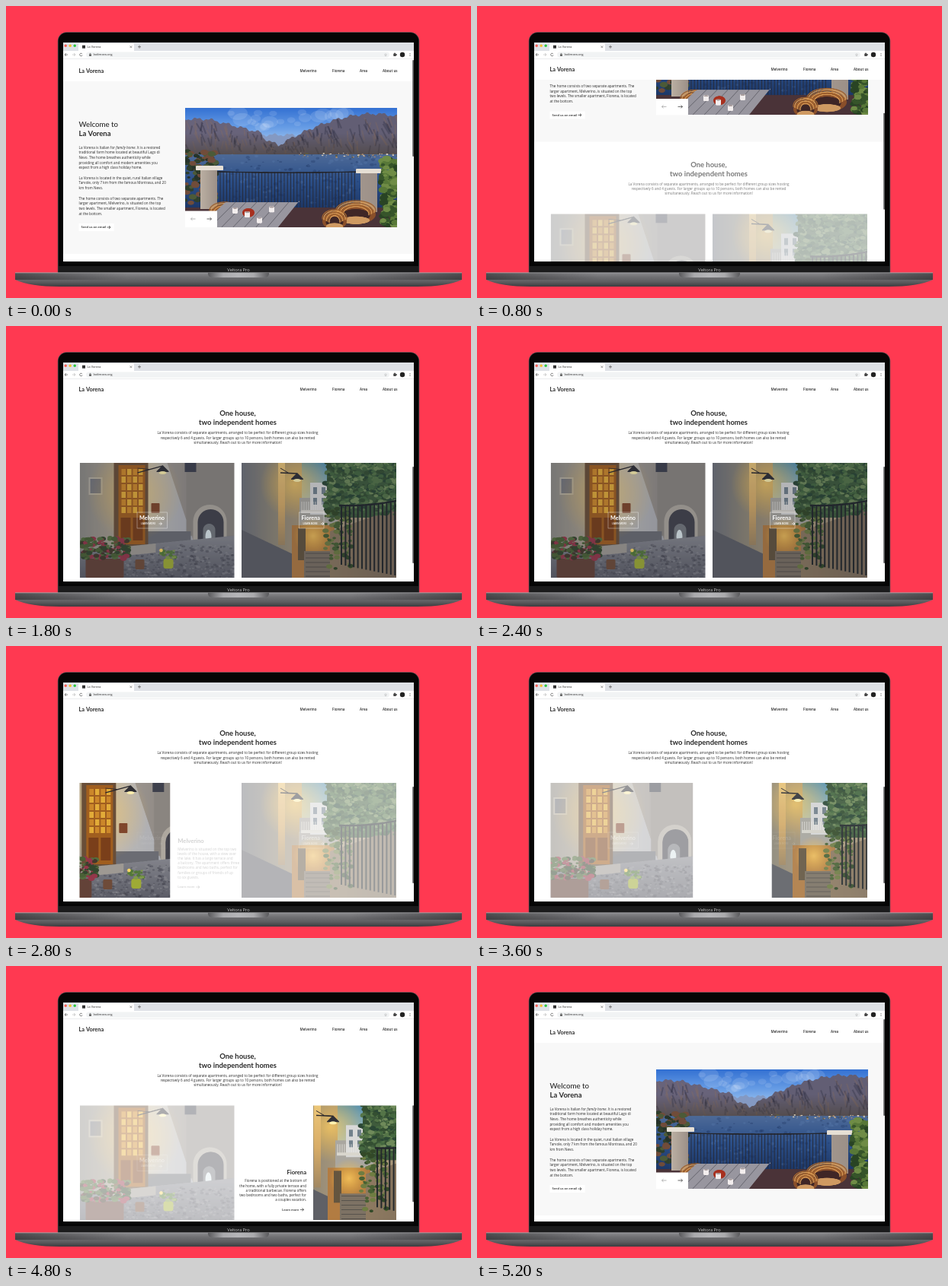
Write an HTML page with a canvas that moves like this. It is 610x384 px and loops after 5.4 s.

```html
<!DOCTYPE html>
<html lang="en">
<head>
<meta charset="utf-8">
<title>La Vorena</title>
<style>
html, body { margin: 0; width: 100%; height: 100%; overflow: hidden; background: #ff3951; }
canvas { display: block; width: 610px; height: 384px; }
</style>
</head>
<body>
<canvas id="stage"></canvas>
<script>
const W = 610, H = 384, LOOP = 5400, STEP = 200;
const SANS = '"Open Sans", "Noto Sans", sans-serif';
const HEAD = 'Lato, "Open Sans", sans-serif';
const HOME = 'La Vorena', APT1 = 'Melverino', APT2 = 'Fiorena';
const INK = '#2a2a2a', TAU = Math.PI * 2;
const dpr = window.devicePixelRatio || 1;
const stage = document.getElementById('stage');
stage.width = W * dpr;
stage.height = H * dpr;
const screen2d = stage.getContext('2d');
let c = screen2d;

// --- helpers ---
const clamp = v => Math.max(0, Math.min(1, v));
const ramp = (t, a, b) => clamp((t - a) / (b - a));
const smooth = (t, a, b) => { const u = ramp(t, a, b); return u * u * (3 - 2 * u); };
const mix = (a, b, u) => a + (b - a) * u;

function rng(seed) {
  return () => (seed = (seed * 16807) % 2147483647) / 2147483647;
}
function box(color, x, y, w, h, r = 0) {
  c.fillStyle = color;
  c.beginPath();
  c.roundRect(x, y, w, h, r);
  c.fill();
}
function dot(color, x, y, rx, ry = rx) {
  c.fillStyle = color;
  c.beginPath();
  c.ellipse(x, y, rx, ry, 0, 0, TAU);
  c.fill();
}
function line(color, width, ...pts) {
  c.strokeStyle = color;
  c.lineWidth = width;
  c.beginPath();
  for (let i = 0; i < pts.length; i += 2) c.lineTo(pts[i], pts[i + 1]);
  c.stroke();
}
// Fills between two curves given as functions of x
function area(color, x0, x1, top, bottom) {
  c.fillStyle = color;
  c.beginPath();
  for (let x = x0; x < x1; x += 2) c.lineTo(x, top(x));
  c.lineTo(x1, top(x1));
  c.lineTo(x1, bottom(x1));
  for (let x = x1; x > x0; x -= 2) c.lineTo(x, bottom(x));
  c.lineTo(x0, bottom(x0));
  c.fill();
}
const slope = (x0, y0, x1, y1) => x => mix(y0, y1, (x - x0) / (x1 - x0));
const level = y => () => y;

function fade(x0, y0, x1, y1, ...colors) {
  const g = c.createLinearGradient(x0, y0, x1, y1);
  colors.forEach((k, i) => g.addColorStop(i / (colors.length - 1), k));
  return g;
}
const down = (h, ...colors) => fade(0, 0, 0, h, ...colors);
const across = (w, ...colors) => fade(0, 0, w, 0, ...colors);

function glow(x, y, r, strength) {
  const g = c.createRadialGradient(x, y, 0, x, y, r);
  g.addColorStop(0, `rgba(255,205,95,${strength})`);
  g.addColorStop(1, 'rgba(255,190,60,0)');
  c.fillStyle = g;
  c.fillRect(x - r, y - r, 2 * r, 2 * r);
}
function speckle(seed, n, x, y, w, h, size, ...colors) {
  const rnd = rng(seed);
  for (let i = 0; i < n; i++) {
    const px = x + rnd() * w, py = y + rnd() * h, s = size * (0.5 + rnd());
    dot(colors[Math.floor(rnd() * colors.length)], px, py, s, s * 0.7);
  }
}
function bars(color, width, x0, x1, gap, top, bottom) {
  for (let x = x0; x <= x1; x += gap) line(color, width, x, top(x), x, bottom(x));
}
// y is the optical middle of the line
function text(s, x, y, size, o = {}) {
  c.font = `${o.style || ''} ${o.weight || 500} ${size}px ${o.font || SANS}`;
  c.textAlign = o.align || 'left';
  c.fillStyle = o.color || INK;
  c.fillText(s, x, y + size * 0.35);
  return c.measureText(s).width;
}
function title(s, x, y, size, o = {}) {
  text(s, x, y, size, { font: HEAD, weight: 700, ...o });
}
function arrow(x, y, len, color = INK) {
  const tip = x + len, back = tip - Math.sign(len) * 2;
  line(color, 0.7, x, y, tip, y);
  line(color, 0.7, back, y - 1.9, tip, y, back, y + 1.9);
}
function picture(w, h, paint) {
  const cv = document.createElement('canvas'), k = 2;
  cv.width = w * k;
  cv.height = h * k;
  c = cv.getContext('2d');
  c.scale(k, k);
  paint(w, h);
  c = screen2d;
  return cv;
}

// --- photographs as flat shapes ---
const rough = x => Math.sin(x * 0.31) * 1.5 + Math.sin(x * 0.83 + 1);
const leftRidge = x => 15 + 0.26 * Math.max(0, x - 30) + 0.00006 * x ** 3 * (x > 100) * 0.1 + rough(x);
const rightRidge = x => 8 + 50 * Math.abs((247 - x) / 137) ** 1.8 + rough(x);

function mountain(seed, x0, x1, ridge, shore, color) {
  area(color, x0, x1, ridge, level(shore));
  const rnd = rng(seed);
  for (let i = 0; i < (x1 - x0) * 0.7; i++) {
    const x = mix(x0, x1, rnd()), depth = Math.max(0, shore - ridge(x));
    const y = ridge(x) + depth * rnd() * 0.8, run = depth * 0.25;
    const tone = rnd() < 0.55 ? 'rgba(45,47,66,.35)' : 'rgba(140,112,92,.28)';
    line(tone, 2, x, y, x + (rnd() - 0.3) * run, Math.min(shore, y + run));
  }
  area(fade(0, shore - 28, 0, shore, 'rgba(72,62,48,0)', 'rgba(72,62,48,.55)'), x0, x1, x => Math.max(ridge(x), shore - 28), level(shore));
}

function wickerChair(x, y, rx, ry) {
  dot('#8a4f2a', x, y + ry * 0.4, rx, ry);
  dot('#3f2626', x, y + ry * 0.5, rx * 0.72, ry * 0.65);
  for (let i = 0; i < 6; i++) {
    c.strokeStyle = i % 2 ? '#d99b55' : '#a3642f';
    c.lineWidth = 1.3;
    c.beginPath();
    c.ellipse(x, y + i, rx - i * 1.8, ry - i * 0.6, 0, Math.PI * 0.95, Math.PI * 2.05);
    c.stroke();
  }
  dot('#cf9a62', x, y + ry, rx * 0.7, ry * 0.4);
}

function pillar(x, y, w) {
  box(across(x + w, '#d8cdbb', '#9c9088'), x, y, w, 52);
  box('#e6dfd4', x - 6, y - 5, w + 14, 6, 1);
}

function paintLake(w, h) {
  const shore = 62, floor = 132;
  box(down(55, '#3370d2', '#6a9fe6', '#b5d3f4'), 0, 0, w, h);
  speckle(8, 26, 60, 6, 150, 26, 9, 'rgba(235,243,255,.13)');
  area('#8499c2', 70, 190, x => 36 + rough(x), level(shore));
  mountain(5, 0, 150, leftRidge, shore, '#68637a');
  mountain(9, 108, w, rightRidge, shore, '#625e74');
  box(fade(0, shore, 0, floor, '#4d6a98', '#2c4f88', '#1d3868'), 0, shore, w, h);
  speckle(31, 190, 50, shore, 215, 70, 2, 'rgba(105,140,190,.2)', 'rgba(18,40,85,.25)');
  speckle(3, 60, 150, shore - 2, 128, 6, 1, '#d6cbb8', '#a98c70', '#5d5a42');
  speckle(7, 130, 0, shore - 4, 40, 70, 4, '#2f3f2c', '#4c5a38', '#704c3a', '#26332a');
  box('#4a3338', 0, floor, w, h - floor);
  const rail = x => 84 + Math.sin((x - 43) / 60) * 1.2;
  bars('#262936', 0.9, 46, 226, 4.2, rail, level(floor));
  area('#23252c', 40, 228, rail, x => rail(x) + 1.5);
  pillar(20, 82, 22);
  pillar(230, 86, 22);
  speckle(12, 190, 258, 66, 20, 90, 4, '#36542a', '#587838', '#294424', '#6f8c46');
  wickerChair(224, 136, 26, 13);
  wickerChair(196, 146, 16, 11);
  wickerChair(52, 136, 20, 11);
  const edge = slope(18, h, 52, 126);
  area('#98969f', 18, 150, x => Math.max(edge(x), 125), x => Math.min(h, h - (x - 122) * 1.25));
  for (let i = 1; i < 7; i++) line('#65646d', 0.7, 52 + i * 14, 125, 18 + i * 15, h);
  dot('#a7301f', 83, 139, 8, 6);
  for (let i = 0; i < 4; i++) {
    const x = 62 + i * 16, y = 138 + 8 * Math.sin(i * 2.2 + 4);
    box('#f3eeee', x, y, 7, 8, 1.5);
    dot('#a79c9c', x + 3.5, y + 1, 3, 1);
  }
}

function archway(color, x, y, r, foot) {
  c.fillStyle = color;
  c.beginPath();
  c.arc(x, y, r, Math.PI, 0);
  c.lineTo(x + r, foot);
  c.lineTo(x - r, foot);
  c.fill();
}
function lamp(x, y, wallX, wallY) {
  line('#28272c', 1.4, wallX, wallY, x, y - 8);
  line('#28272c', 0.8, wallX, wallY - 6, mix(wallX, x, 0.5), mix(wallY, y - 8, 0.5));
  area('#303036', x - 8, x + 8, t => y - 9 + Math.abs(t - x), level(y));
  dot('#fff2af', x, y + 1, 5, 2);
}

function paintAlley(w, h) {
  const ground = x => 116 - 0.1 * x;
  box(across(90, '#8d8b86', '#a89f8f', '#c9b189'), 0, 0, w, h);
  box('#b5b0a4', 12, 19, 18, 23);
  box('#737680', 14, 21, 14, 19);
  box(across(150, '#c0b090', '#c6c2ba', '#aeb0b6'), 88, 0, 62, h);
  area(across(w, '#aaa69d', '#a39c94', '#817d7a'), 115, w, x => Math.max(0, x - 148) * 0.1, x => 3 * (x - 115));
  box('#8d8882', 140, 0, w, ground(w));
  box('#3f414d', 138, 0, 15, 12);
  archway('#b0aaa0', 171, 77, 22, 113);
  archway('#44444c', 172, 78, 17, 112);
  archway('#76797e', 170, 88, 8, 110);
  dot('#e2edf0', 169, 97, 4, 9);
  area(fade(0, 100, 0, h, '#85868d', '#5e5f68'), 0, w, ground, level(h));
  speckle(21, 380, 60, 108, 143, 43, 1.6, 'rgba(150,150,156,.4)', 'rgba(64,64,74,.4)');
  area('#6d6e74', 90, 146, level(90), ground);
  // door with lit panes
  glow(72, 40, 62, 0.55);
  box('#6b5038', 45, 0, 45, 110);
  box('#a3601f', 51, 3, 35, 104);
  for (let i = 0; i < 24; i++) {
    box((i + (i >> 2)) % 2 ? '#e6ae38' : '#d08a2a', 55 + (i % 4) * 7.5, 8 + (i >> 2) * 10, 5.5, 8);
  }
  for (let i = 0; i < 2; i++) box('#7c4019', 54 + i * 16, 72, 13, 30);
  area('#a19c95', 42, 100, ground, x => ground(x) + 12);
  box('#82472b', 94, 53, 11, 13, 1);
  lamp(109, 12, 76, 13);
  // pots
  box('#654338', 8, 126, 50, 25, 2);
  speckle(17, 170, 2, 98, 62, 28, 3, '#34482e', '#56703e', '#45392c', '#4b6236', '#96384a');
  box('#a1ad35', 110, 126, 13, 13, 3);
  speckle(19, 24, 107, 115, 18, 10, 2.2, '#557a39', '#839d4a');
  dot('#ffd968', 107, 115, 2.3);
  box('#704d39', 73, 127, 12, 13, 2);
}

function paintSteps(w, h) {
  box(across(82, '#6f727a', '#8f8878', '#a9977a'), 0, 0, w, h);
  box(down(55, '#5b93ad', '#a9c8d2'), 79, 0, 48, 64);
  glow(70, 28, 46, 0.75);
  box(down(110, '#ecc678', '#d8ad68', '#a08763'), 48, 0, 9, 108);
  area('#5f6066', 0, 80, slope(0, 88, 80, 126), level(h));
  // houses beyond the lane
  box('#aaa7a0', 76, 46, 50, 62);
  box('#d9d9d8', 90, 26, 26, 42);
  for (let i = 0; i < 4; i++) box('#72818c', 94 + (i % 2) * 11, 32 + (i >> 1) * 14, 5, 9);
  bars('#f0eee8', 0.7, 79, 124, 3, level(51), level(64));
  box('#d9d6cd', 78, 62, 46, 4);
  area('#b27c42', 66, 122, level(82), level(h));
  glow(94, 96, 26, 0.8);
  box('#64553f', 74, 86, 10, 42);
  area('#7d7264', 82, 122, level(116), level(h));
  for (let y = 119; y < h; y += 6) line('#57524c', 1, 84, y, 122, y);
  // leaves and wall behind the railing
  box('#3f5b3c', 112, 0, 91, 72);
  area(across(w, '#a58c6a', '#7d6d5a'), 116, w, slope(116, 90, w, 60), level(h));
  speckle(41, 520, 110, 0, 94, 68, 3, '#344f32', '#557548', '#456840', '#6f8a5a', '#2b4735');
  speckle(43, 90, 110, 60, 34, 80, 3, '#486133', '#334928', '#6f7d42');
  const rail = x => 55 - 0.0016 * (x - 140) ** 2;
  bars('#23282b', 2, 131, w, 5.4, rail, x => 134 + (x - 131) * 0.2);
  area('#22272b', 128, w, rail, x => rail(x) + 2.4);
  lamp(73, 22, 51, 13);
}

const lake = picture(278, 158, paintLake);
const alley = picture(203, 151, paintAlley);
const steps = picture(203, 151, paintSteps);

// --- page ---
const INTRO = [
  '', 'traditional farm home located at beautiful Lago di',
  'Nevo. The home breathes authenticity while', 'providing all comfort and modern amenities you',
  'expect from a high class holiday home.', '',
  HOME + ' is located in the quiet, rural Italian village',
  'Tarvole, only 7 km from the famous Montrasa, and 20', 'km from Nevo.', '',
  'The home consists of two separate apartments. The',
  `larger apartment, ${APT1}, is situated on the top`,
  `two levels. The smaller apartment, ${APT2}, is located`, 'at the bottom.'
];
const ABOUT = [
  HOME + ' consists of separate apartments, arranged to be perfect for different group sizes hosting',
  'respectively 6 and 4 guests. For larger groups up to 10 persons, both homes can also be rented',
  'simultaneously. Reach out to us for more information!'
];
const COPY1 = [
  APT1 + ' is situated on the top two', 'levels of the house, with a view over',
  'the lake. It has a large terrace and', 'a balcony. The apartment offers three',
  'bedrooms and two baths, perfect for', 'families or groups of friends of up',
  'to six guests.'
];
const COPY2 = [
  APT2 + ' is positioned at the bottom of', 'the home, with a fully private terrace and',
  `a traditional barbecue. ${APT2} offers`, 'two bedrooms and two baths, perfect for', 'a couples vacation.'
];

function lines(list, x, y, pitch, align) {
  list.forEach((s, i) => text(s, x, y + i * pitch, 4.6, { align }));
}

function hero() {
  const x = 95.5, y = 188;
  box('#f8f8f8', 75, 101, 460, 227);
  title('Welcome to', x, 157.7, 9.7, { weight: 500 });
  title(HOME, x, 169.7, 9.5);
  let pen = x;
  pen += text(HOME + ' is Italian for ', pen, y, 4.6);
  pen += text('family home', pen, y, 4.6, { style: 'italic' });
  text('. It is a restored', pen, y, 4.6);
  lines(INTRO, x, y, 6.69);
  box('#fff', x, 288, 46, 10);
  text('Send us an email', x + 3, 293, 4, { weight: 600 });
  arrow(x + 37, 293, 4.5);
  c.drawImage(lake, 235, 135.7, 278, 157);
  box('#fff', 235, 271.5, 42, 21.5);
  arrow(248.5, 282, -6, '#999');
  arrow(263.5, 282, 6);
}

function label(name, x, y, w) {
  c.strokeStyle = 'rgba(255,255,255,.6)';
  c.lineWidth = 0.6;
  c.strokeRect(x, y, w, 21);
  title(name, x + 3, y + 7.5, 7.3, { color: '#fff' });
  text('LEARN MORE', x + 5, y + 15, 3, { weight: 600, color: '#fff' });
  arrow(x + 28.5, y + 15, 4, '#fff');
}

function card(img, x, w, alpha, hover, other, name, lx, lw) {
  const y = 423, full = 203, h = 151;
  c.save();
  c.globalAlpha = alpha * (1 - 0.6 * other);
  c.beginPath();
  c.rect(x, y, w, h);
  c.clip();
  c.drawImage(img, x + (w - full) / 2, y, full, h);
  c.globalAlpha *= 1 - hover;
  box(`rgba(30,36,50,${0.2 * (1 - other)})`, x, y, w, h);
  label(name, lx, 488, lw);
  c.restore();
}

function details(name, copy, x, align, alpha) {
  if (alpha <= 0) return;
  const pitch = 6.15, top = 548 - copy.length * pitch;
  c.globalAlpha = alpha;
  title(name, x, top - 5.8, 7.6, { align });
  lines(copy, x, top + 5.2, pitch, align);
  const left = align === 'right' ? x - 32 : x;
  text('Learn more', left, 560, 4, { weight: 600 });
  arrow(left + 24, 560, 4.5);
  c.globalAlpha = 1;
}

function homes(t) {
  const swap = smooth(t, 3250, 3726);
  const left = smooth(t, 2400, 2900) * (1 - swap);
  const right = swap * (1 - smooth(t, 4900, 5300));
  const show = 0.08 + 0.92 * smooth(t, 400, 1600);
  c.globalAlpha = 0.25 + 0.75 * smooth(t, 300, 1300);
  title('One house,', 304, 358, 9.45, { align: 'center' });
  title('two independent homes', 304, 370, 9.45, { align: 'center' });
  lines(ABOUT, 304, 383.8, 6.2, 'center');
  c.globalAlpha = 1;
  const w1 = 203 - 94 * left, w2 = 203 - 94 * right;
  card(alley, 96.5, w1, show, left, right, APT1, 172, 39.5);
  card(steps, 512 - w2, w2, show, right, left, APT2, 384.5, 32.5);
  details(APT1, COPY1, 106.5 + w1, 'left', ramp(t, 2720, 3100) * (1 - ramp(t, 3200, 3380)));
  details(APT2, COPY2, 503 - w2, 'right', ramp(t, 3650, 4350) * (1 - ramp(t, 4850, 5000)));
}

function header(scroll) {
  const up = Math.min(scroll, 4), y = 87 - up * 0.8;
  box('#fff', 75, 70, 460, 31 - up);
  title(HOME, 95.5, y, 7.4);
  const item = (s, x) => text(s, x, y - 0.2, 4.55, { weight: 600 });
  item(APT1, 385.5);
  item(APT2, 428);
  item('Area', 464);
  item('About us', 494);
}

// --- browser and laptop ---
function browser() {
  const tabY = 53.7, barY = 64, gray = '#555';
  box('#dee1e6', 75, 48, 460, 11);
  ['#f65f57', '#f9bd2e', '#2ac840'].forEach((k, i) => dot(k, 78.2 + i * 6, 52.3, 1.7));
  box('#fff', 95, 49, 73, 11, [2, 2, 0, 0]);
  box('#333', 100, tabY - 2, 4, 4);
  text(HOME, 106.5, tabY, 3.9);
  [-1, 1].forEach(d => line(gray, 0.6, 162.6, tabY - 1.3 * d, 165.2, tabY + 1.3 * d));
  line(gray, 0.7, 173, tabY, 177, tabY);
  line(gray, 0.7, 175, tabY - 2, 175, tabY + 2);
  box('#fff', 75, 59, 460, 11);
  box('#f1f3f4', 105, 60.4, 398, 7.4, 3.7);
  arrow(81, barY, -4, gray);
  arrow(87, barY, 4, '#bbb');
  c.strokeStyle = gray;
  c.lineWidth = 0.7;
  c.beginPath();
  c.arc(98.5, barY, 1.8, 0.3, 5.6);
  c.stroke();
  box(gray, 109, barY - 0.6, 3, 2.4, 0.4);
  c.beginPath();
  c.arc(110.5, barY - 0.7, 0.9, Math.PI, 0);
  c.stroke();
  text('ladimora.org', 114.5, barY, 4.2);
  text('☆', 498, barY, 5, { font: '"DejaVu Sans", sans-serif', align: 'center', color: gray });
  box('#444', 508.3, barY - 1.4, 3.4, 3.4, 0.6);
  dot('#444', 510, barY - 1.7, 0.9);
  dot('#444', 512, barY, 0.9);
  dot('#222', 520, barY, 3.2);
  [-1.6, 0, 1.6].forEach(d => dot(gray, 530, barY + d, 0.5));
  box('#e6e7e9', 75, 69.3, 460, 0.6);
}

function laptop() {
  box('#ff3951', 0, 0, W, H);
  box('#4b4b4f', 67.8, 34.2, 474.4, 318, [12, 12, 0, 0]);
  box('#050505', 68.6, 35, 472.8, 317, [11, 11, 0, 0]);
  box('#1b1b1c', 69, 342, 472, 9);
  text('Veltora Pro', 305, 346.6, 5.7, { align: 'center', color: '#c9c9c9' });
}

function base() {
  const shade = 'rgba(25,25,27,.5)', none = 'rgba(25,25,27,0)';
  c.fillStyle = fade(0, 350, 0, 369, '#8e8e91', '#707073', '#5e5e61', '#3c3c3f');
  c.beginPath();
  c.moveTo(12, 350.7);
  c.lineTo(598, 350.7);
  c.lineTo(598, 360);
  c.quadraticCurveTo(578, 369, 540, 369);
  c.lineTo(70, 369);
  c.quadraticCurveTo(32, 369, 12, 360);
  c.fill();
  box(fade(12, 0, 598, 0, shade, none, none, none, shade), 12, 351, 586, 9);
  box('#a9a9ac', 12, 350.5, 586, 0.8);
  box(fade(265, 0, 345, 0, '#59595c', '#aaaaad', '#b5b5b8', '#aaaaad', '#59595c'), 265, 350.7, 80, 6.3, [0, 0, 5, 5]);
}

function draw(t) {
  const scroll = (2 + 241 * smooth(t, 0, 1390)) * (1 - smooth(t, 4770, 5200));
  c.setTransform(dpr, 0, 0, dpr, 0, 0);
  laptop();
  c.save();
  c.beginPath();
  c.rect(75, 48, 460, 288);
  c.clip();
  box('#fff', 75, 48, 460, 288);
  c.save();
  c.translate(0, -scroll);
  hero();
  homes(t);
  c.restore();
  header(scroll);
  browser();
  box('#2c2d30', 533.4, 70 + scroll * 0.473, 1.4, 127, 0.7);
  c.restore();
  base();
}

let shown = -1;
function tick() {
  const n = Math.floor((performance.now() % LOOP) / STEP);
  if (n !== shown) {
    shown = n;
    draw(n * STEP);
  }
  requestAnimationFrame(tick);
}
tick();
</script>
</body>
</html>
```
